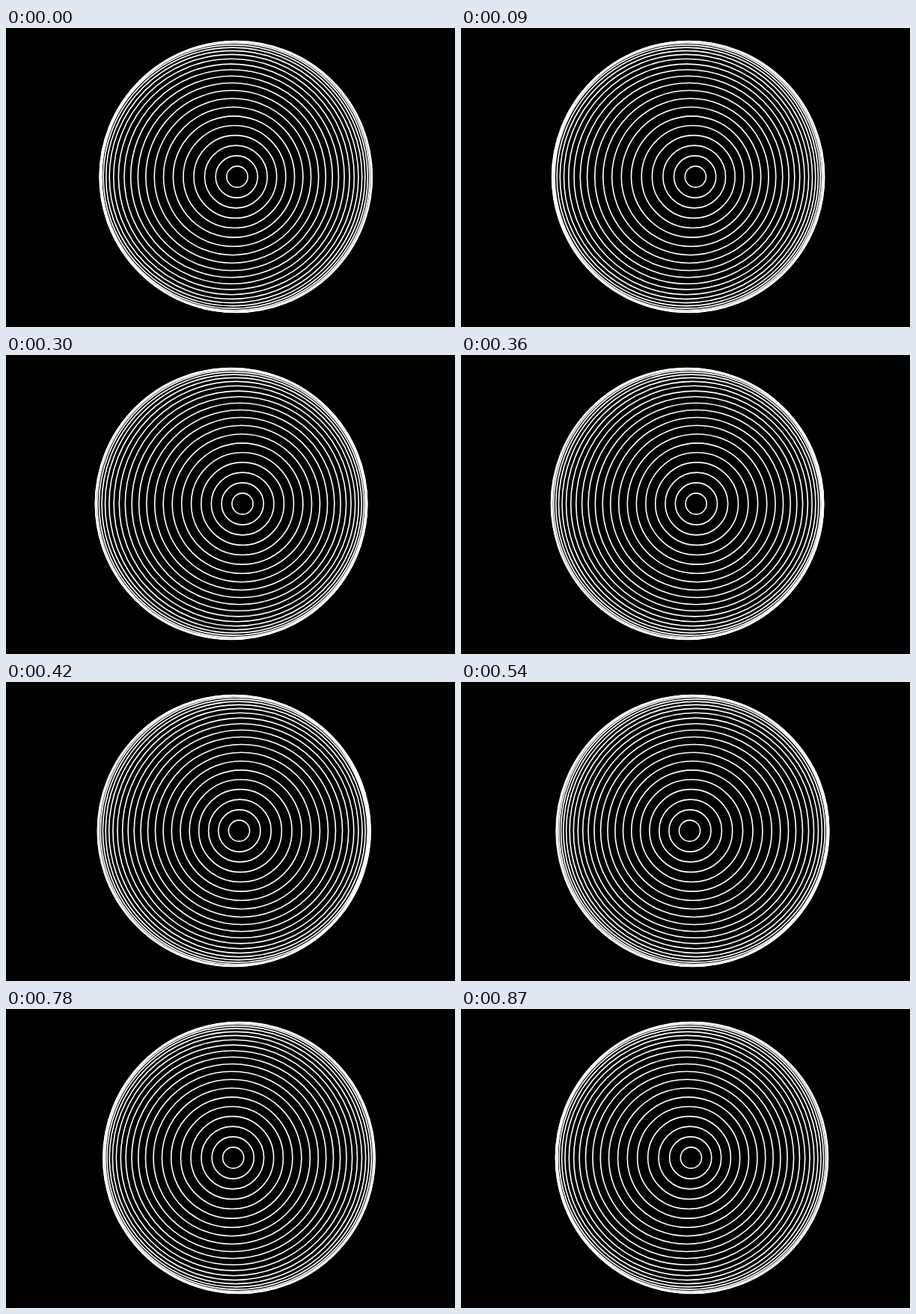
An HTML page that plays this animation: 600 by 400 pixels, repeating every 900 ms.

```html
<!DOCTYPE html>
<html lang="en">
<head>
<meta charset="utf-8">
<title>Swaying rings</title>
<style>
  html, body { margin: 0; width: 100%; height: 100%; overflow: hidden; background: #000; }
  svg { display: block; width: 600px; height: 400px; }
  circle { fill: none; stroke: #fff; stroke-width: 1.6; }
</style>
</head>
<body>
<svg id="stage" viewBox="0 0 600 400"></svg>
<script>
const LOOP = 900, STEP = 30;
const COUNT = 23, CENTER_Y = 199;
const LIMB = 181.5, EYE = 4.5, ANGLE = 0.062;
const svg = document.getElementById('stage');

// Latitude circle of a sphere seen in perspective from its pole
function radius(k) {
  const a = k * ANGLE;
  return LIMB * Math.sqrt(EYE * EYE - 1) * Math.sin(a) / (EYE - Math.cos(a));
}

const rings = Array.from({ length: COUNT }, (_, i) => {
  const k = i + 1;
  const el = document.createElementNS('http://www.w3.org/2000/svg', 'circle');
  el.setAttribute('cy', CENTER_Y);
  el.setAttribute('r', radius(k).toFixed(2));
  svg.append(el);
  return {
    el,
    mid: 309.6 - 0.14 * k,
    sway: 7.4 - 0.06 * k,
    peak: 235 + 12 * Math.pow(i, 1.2)
  };
});

function draw(ms) {
  const t = Math.floor((ms % LOOP) / STEP) * STEP;
  for (const { el, mid, sway, peak } of rings) {
    const x = mid + sway * Math.cos(2 * Math.PI * (t - peak) / LOOP);
    el.setAttribute('cx', x.toFixed(2));
  }
}

const start = performance.now();
function tick() {
  draw(performance.now() - start);
  requestAnimationFrame(tick);
}
draw(0);
requestAnimationFrame(tick);
</script>
</body>
</html>
```
